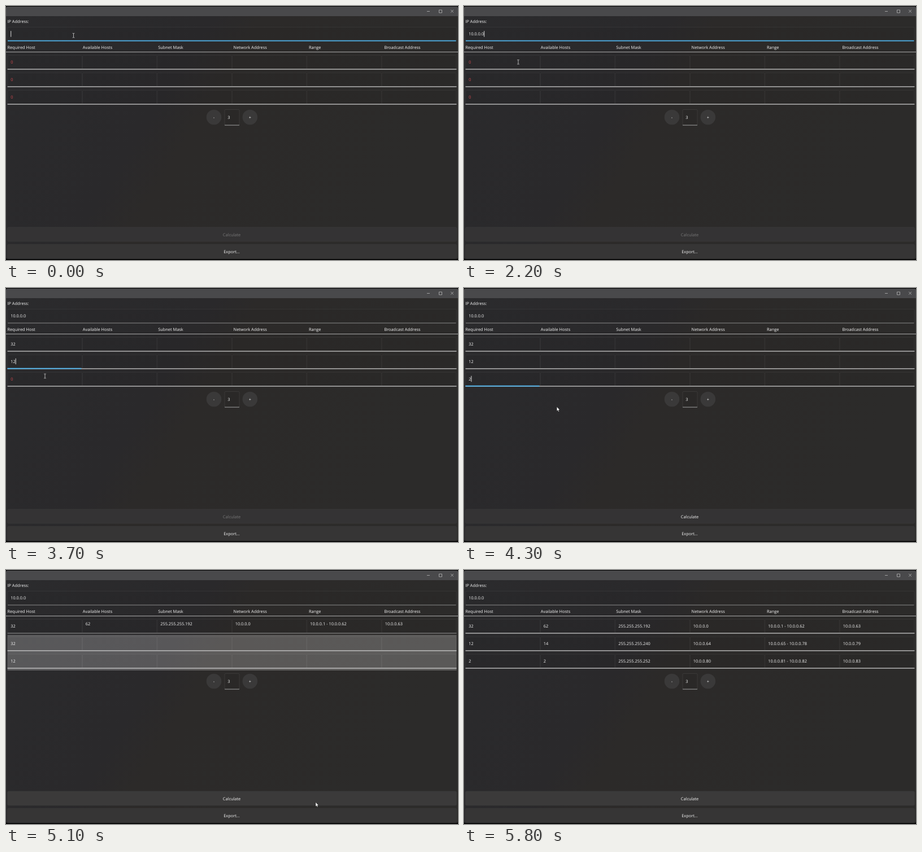
Recreate the animation shown at these times as an HTML page. Size 800x450 px, loop 6200 ms.

```html
<!DOCTYPE html>
<html lang="en">
<head>
<meta charset="utf-8">
<title>Subnet calculator</title>
<style>
html, body { margin: 0; width: 100%; height: 100%; overflow: hidden; background: #000; }
svg { display: block; width: 800px; height: 450px; }
text { font: 7.4px "Open Sans", "Noto Sans", sans-serif; fill: #f4f4f4; text-rendering: geometricPrecision; white-space: pre; }
.mid { text-anchor: middle; }
</style>
</head>
<body>
<svg id="stage" viewBox="0 0 800 450">
  <defs>
    <linearGradient id="backdrop" x1="0" y1="0" x2="1" y2="0.35">
      <stop offset="0" stop-color="#2b2b2d"/>
      <stop offset=".42" stop-color="#2a292b"/>
      <stop offset=".52" stop-color="#2c2a29"/>
      <stop offset="1" stop-color="#2c2b2a"/>
    </linearGradient>
  </defs>
</svg>
<script>
const LOOP = 6200, STEP = 100;
const ROW_Y = [99, 130, 161];
const COL_W = 132.45, LEFT = 2.5;
const RED = '#d0484e', WHITE = '#f4f4f4', BLUE = '#4fb0e6';
const stage = document.getElementById('stage');

function add(tag, attrs, parent = stage) {
  const el = document.createElementNS('http://www.w3.org/2000/svg', tag);
  set(el, attrs);
  return parent.appendChild(el);
}
function set(el, attrs) {
  for (const key in attrs) el.setAttribute(key, attrs[key]);
}
const rect = (x, y, width, height, fill, more = {}) => add('rect', { x, y, width, height, fill, ...more });
const label = (x, y, content = '', more = {}) => {
  const el = add('text', { x, y, ...more });
  el.textContent = content;
  return el;
};
const show = (el, visible) => el.setAttribute('visibility', visible ? 'visible' : 'hidden');

// Window frame
rect(0, 1, 800, 447.5, 'url(#backdrop)', { rx: 3 });
add('path', { d: 'M0 18V4Q0 1 3 1H797Q800 1 800 4V18Z', fill: '#49494b' });
add('path', {
  d: 'M745 9.5H750M766.5 7H771.5V12H766.5ZM787.2 6.8L792 11.6M792 6.8L787.2 11.6',
  fill: 'none', stroke: '#b8b8b8', 'stroke-width': 0.8
});

// Address field and table head
label(2.4, 29.5, 'IP Address:');
rect(3, 37.5, 794, 24.5, '#000', { 'fill-opacity': 0.05, stroke: '#fff', 'stroke-opacity': 0.05, rx: 1.5 });
const addressLine = rect(3, 61, 793.5, 1, '#8f8f8f');
const address = label(8.2, 52.2);
['Required Host', 'Available Hosts', 'Subnet Mask', 'Network Address', 'Range', 'Broadcast Address']
  .forEach((name, i) => label(2.4 + i * 133.4, 75.7, name));
rect(0, 81, 800, 1, '#a9a9a9');

// Table rows
const overlay = rect(2.5, 115, 795, 63, '#ffffff', { 'fill-opacity': 0.235 });
const rows = ROW_Y.map(y => {
  for (let c = 0; c < 6; c++) {
    rect(LEFT + c * COL_W + 0.5, y - 11.5, COL_W - 1, 24, '#000',
      { 'fill-opacity': 0.04, stroke: '#fff', 'stroke-opacity': 0.06, 'stroke-width': 0.8, rx: 1.5 });
  }
  const line = rect(LEFT, y + 12.4, 795, 1.2, '#d2d2d2');
  const focus = rect(LEFT, y + 11.7, 131, 1.9, BLUE);
  const cells = Array.from({ length: 6 }, (_, c) => label(8.2 + c * 132.5, y + 2.8));
  return { line, focus, cells };
});

// Row counter
for (const [x, sign] of [[368, '-'], [431.8, '+']]) {
  add('circle', { cx: x, cy: 197, r: 13.3, fill: '#3a3939' });
  label(x, 200.3, sign, { class: 'mid' });
}
rect(387, 183.5, 26, 28, '#000', { 'fill-opacity': 0.04, stroke: '#fff', 'stroke-opacity': 0.07, rx: 1.5 });
rect(387, 210.6, 26, 1, '#9a9a9a');
label(392.2, 199.8, '3');

// Action buttons
const button = (y, name) => ({
  box: rect(2.5, y, 795, 25, '#363535', { rx: 2, stroke: '#3c3b3b', 'stroke-width': 0.7 }),
  name: label(399.5, y + 16, name, { class: 'mid' })
});
const calculate = button(392, 'Calculate');
button(422.3, 'Export...');

// Caret and pointer
const caret = rect(0, 0, 0.9, 10.5, '#f0f0f0');
const beam = add('path', {
  d: 'M-1.8 -3.8H-.5L0 -3.4L.5 -3.8H1.8M0 -3.4V3.4M-1.8 3.8H-.5L0 3.4L.5 3.8H1.8',
  fill: 'none', stroke: '#d8d8d8', 'stroke-width': 0.8
});
const arrow = add('path', {
  d: 'M0 0V7.4L1.7 5.9L2.9 8.6L4.1 8.1L3 5.5H5.2Z',
  fill: '#fff', stroke: '#111', 'stroke-width': 0.4
});

// Each entry is [start time, value]; the latest started one holds.
const addressTyping = [[0, ''], [400, '1'], [500, '10'], [700, '10.'], [900, '10.0'], [1100, '10.0.'],
  [1300, '10.0.0'], [1400, '10.0.0.'], [1500, '10.0.0.0']];
const hostTyping = [
  [[0, '0'], [2900, ''], [3000, '3'], [3100, '32']],
  [[0, '0'], [3500, ''], [3600, '1'], [3700, '12']],
  [[0, '0'], [3900, ''], [4000, '2']]
];
const focusSteps = [[0, 'address'], [2400, 0], [3400, 1], [3800, 2], [5000, null]];
const pointerPath = [[0, 119.5, 52.2], [1800, 119.5, 52.2], [1900, 150, 56], [2000, 186, 70], [2100, 140, 92],
  [2200, 96, 99.2], [3100, 96, 99.2], [3400, 76, 131], [3500, 74, 135], [3700, 69, 156], [3800, 69.5, 160],
  [4100, 69.5, 160], [4800, 547.5, 415], [4900, 547.8, 412], [5000, 548, 411.5], [5500, 548, 411.5],
  [5600, 550, 421], [5700, 552.5, 436], [LOOP, 552.5, 436]];
const results = [
  ['32', '62', '255.255.255.192', '10.0.0.0', '10.0.0.1 - 10.0.0.62', '10.0.0.63'],
  ['12', '14', '255.255.255.240', '10.0.0.64', '10.0.0.65 - 10.0.0.78', '10.0.0.79'],
  ['2', '2', '255.255.255.252', '10.0.0.80', '10.0.0.81 - 10.0.0.82', '10.0.0.83']
];

const latest = (steps, t) => steps.filter(s => s[0] <= t).pop()[1];

function pointerAt(t) {
  const i = pointerPath.findIndex(p => p[0] > t);
  const [t0, x0, y0] = pointerPath[i - 1], [t1, x1, y1] = pointerPath[i];
  let k = (t - t0) / (t1 - t0);
  if (t1 - t0 === 700) k = k * k * (3 - 2 * k);
  return [x0 + (x1 - x0) * k, y0 + (y1 - y0) * k];
}

function write(el, content, color = WHITE) {
  if (el.textContent !== content) el.textContent = content;
  el.style.fill = color;
}

function drawRows(t, focus) {
  const reloading = t >= 5100 && t < 5200, done = t >= 5200;
  show(overlay, reloading);
  rows.forEach(({ line, focus: focusLine, cells }, r) => {
    const host = reloading ? ['32', '32', '12'][r] : latest(hostTyping[r], t);
    write(cells[0], host, host === '0' ? RED : WHITE);
    const filled = done || (reloading && r === 0);
    for (let c = 1; c < 6; c++) {
      write(cells[c], filled ? results[r][c] : '');
      cells[c].setAttribute('y', ROW_Y[r] + (reloading ? -0.8 : 2.8));
    }
    line.setAttribute('fill', reloading && r === 0 ? '#858585' : '#d2d2d2');
    show(focusLine, focus === r);
  });
}

function drawPointer(t) {
  const [x, y] = pointerAt(t);
  const inField = (y > 37 && y < 62) || (y > 87 && y < 175);
  const visible = t < 5800, place = { transform: `translate(${x} ${y})` };
  set(beam, place);
  set(arrow, place);
  show(beam, visible && inField);
  show(arrow, visible && !inField);
}

function render(time) {
  const t = Math.floor((time % LOOP) / STEP) * STEP;
  const focus = latest(focusSteps, t), onAddress = focus === 'address';

  write(address, latest(addressTyping, t), t < 1500 ? RED : WHITE);
  set(addressLine, onAddress ? { y: 60.7, height: 1.8, fill: BLUE } : { y: 61.6, height: 0.9, fill: '#8f8f8f' });
  drawRows(t, focus);

  const active = onAddress ? address : focus === null ? null : rows[focus].cells[0];
  show(caret, active && !(t >= 4600 && t < 5000));
  if (active) {
    set(caret, { x: 8.3 + active.getComputedTextLength(), y: (onAddress ? 49.5 : ROW_Y[focus]) - 5.3 });
  }

  calculate.name.style.fill = t < 4000 ? '#777' : t === 5000 ? '#cdcdcd' : WHITE;
  calculate.box.setAttribute('fill', t < 4900 ? '#343334' : t === 5000 ? '#363535' : '#3b3a3a');
  drawPointer(t);
}

const start = performance.now();
function tick() {
  render(performance.now() - start);
  requestAnimationFrame(tick);
}
tick();
</script>
</body>
</html>
```
